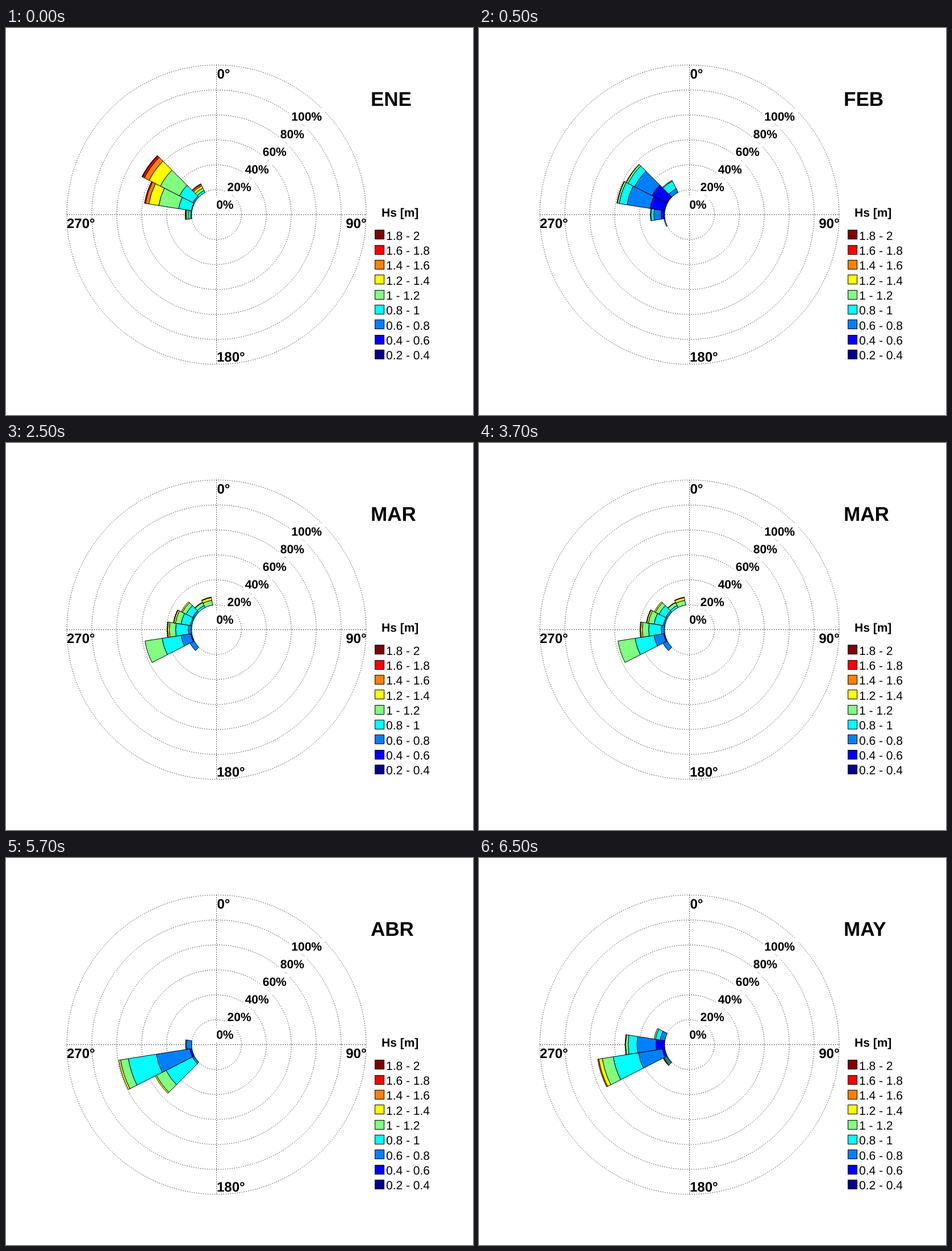
These frames come from a looping animation (822x681 px, 8 s). An HTML page with a canvas:

```html
<!DOCTYPE html>
<html lang="en">
<head>
<meta charset="utf-8">
<title>Monthly wave rose</title>
<style>
  html, body { margin: 0; width: 100%; height: 100%; overflow: hidden; background: #fff; }
  canvas, svg { position: absolute; left: 0; top: 0; width: 822px; height: 681px; }
  text { font-family: "Liberation Sans", Arial, sans-serif; white-space: pre; text-rendering: geometricPrecision; }
</style>
</head>
<body>
<canvas id="rose" width="822" height="681"></canvas>
<svg id="labels" viewBox="0 0 822 681"></svg>
<script>
const CX = 370.5, CY = 328.5, STEP = 43.9, RINGS = 6;
const SECTOR = 18, MIN_BAND = 0.8;
const LOW = 0.2, CLASS = 0.2, LOOP = 8000, HOLD = 2000, FIRST_HOLD = 500;
const ctx = document.getElementById('rose').getContext('2d');
const svg = document.getElementById('labels');

// Height classes from 0.2 m upwards
const COLORS = ['#00008f', '#00f', '#0080ff', '#0ff', '#80ff80', '#ff0', '#ff8000', '#f00', '#800000'];

// Petals: [bearing, length, modal height, spread, highest wave]
const MONTHS = [
  ['ENE', [270, 11.5, 0.95, 0.2], [288, 85, 1.04, 0.16], [306, 103.5, 1.045, 0.19], [324, 18, 1.12, 0.27]],
  ['FEB', [252, 2, 0.9, 0.08], [270, 25.5, 0.645, 0.13], [288, 85.5, 0.62, 0.125], [306, 82, 0.6, 0.14],
    [324, 24, 0.81, 0.07]],
  ['MAR', [234, 8.6, 0.65, 0.04], [252, 83.5, 0.95, 0.25, 1.2], [270, 43, 0.89, 0.13], [288, 33, 0.92, 0.13],
    [306, 26.5, 0.9, 0.14], [324, 10.5, 1, 0.08], [342, 14.4, 1.13, 0.11]],
  ['ABR', [234, 77.5, 0.9, 0.09], [252, 131, 0.76, 0.125], [270, 11, 0.68, 0.07]],
  ['MAY', [234, 8.4, 0.9, 0.28], [252, 120.4, 0.79, 0.16], [270, 70, 0.66, 0.14], [288, 20, 0.78, 0.13]]
];

function label(str, x, y, size, weight = 700, anchor = 'start') {
  const el = document.createElementNS('http://www.w3.org/2000/svg', 'text');
  const attrs = { x, y, 'font-size': size, 'font-weight': weight, 'text-anchor': anchor };
  for (const key in attrs) el.setAttribute(key, attrs[key]);
  el.textContent = str;
  svg.appendChild(el);
  return el;
}

function drawGrid() {
  const r = RINGS * STEP;
  ctx.setLineDash([1.3, 2.7]);
  for (let i = 1; i <= RINGS; i++) {
    ctx.beginPath();
    ctx.arc(CX, CY, i * STEP, 0, 2 * Math.PI);
    ctx.stroke();
  }
  ctx.beginPath();
  ctx.moveTo(CX - r, CY);
  ctx.lineTo(CX + r, CY);
  ctx.moveTo(CX, CY - r);
  ctx.lineTo(CX, CY + r);
  ctx.stroke();
  ctx.setLineDash([]);

  // Blank patches behind the percentages
  ctx.fillStyle = '#fff';
  for (let i = 0; i < RINGS; i++) {
    const w = 18.5 + 11.7 * `${i * 20}`.length;
    ctx.fillRect(398 + 31 * i - w, 297.5 - 31.1 * i, w + 8, 27);
  }
}

function drawLegend() {
  COLORS.forEach((color, i) => {
    const y = Math.round(567 - 26.35 * i) - 0.5;
    ctx.fillStyle = color;
    ctx.fillRect(649.5, y, 16, 16);
    ctx.strokeRect(649.5, y, 16, 16);
  });
}

// Classes share a petal by a Gumbel distribution of wave heights
function drawPetal([bearing, length, mode, spread, top = 2]) {
  const share = h => Math.exp(-Math.exp((mode - h) / spread));
  const rad = deg => (deg - 90) * Math.PI / 180;
  const a = rad(bearing - SECTOR / 2), b = rad(bearing + SECTOR / 2);
  let inner = STEP;
  COLORS.forEach((color, i) => {
    const height = Math.min(top, LOW + CLASS * (i + 1));
    const outer = STEP + length * share(height) / share(top);
    if (outer - inner < MIN_BAND) return;
    ctx.beginPath();
    ctx.arc(CX, CY, inner, a, b);
    ctx.arc(CX, CY, outer, b, a, true);
    ctx.closePath();
    ctx.fillStyle = color;
    ctx.fill();
    ctx.stroke();
    inner = outer;
  });
}

const title = label('', 642, 136.5, 35);
label('0°', 371.5, 88.5, 24);
label('90°', 634.5, 352, 24, 700, 'end');
label('180°', 371, 587, 24);
label('270°', 107, 352, 24);
label('Hs [m]', 661, 332, 21);
for (let i = 0; i < RINGS; i++) {
  label(i * 20 + '%', 400.5 + 31.1 * i, 318 - 31.1 * i, 21, 700, 'end');
}
COLORS.forEach((_, i) => {
  const edge = n => Math.round((LOW + CLASS * n) * 10) / 10;
  label(`${edge(i)} - ${edge(i + 1)}`, 669, 583.3 - 26.35 * i, 21, 400);
});

let shown = -1;
function tick(now) {
  const t = now % LOOP;
  const index = Math.floor((t + HOLD - FIRST_HOLD) / HOLD);
  if (index !== shown) {
    shown = index;
    const [name, ...petals] = MONTHS[index];
    ctx.clearRect(0, 0, 822, 681);
    drawGrid();
    drawLegend();
    petals.forEach(drawPetal);
    title.textContent = name;
  }
  requestAnimationFrame(tick);
}
tick(0);
</script>
</body>
</html>
```
